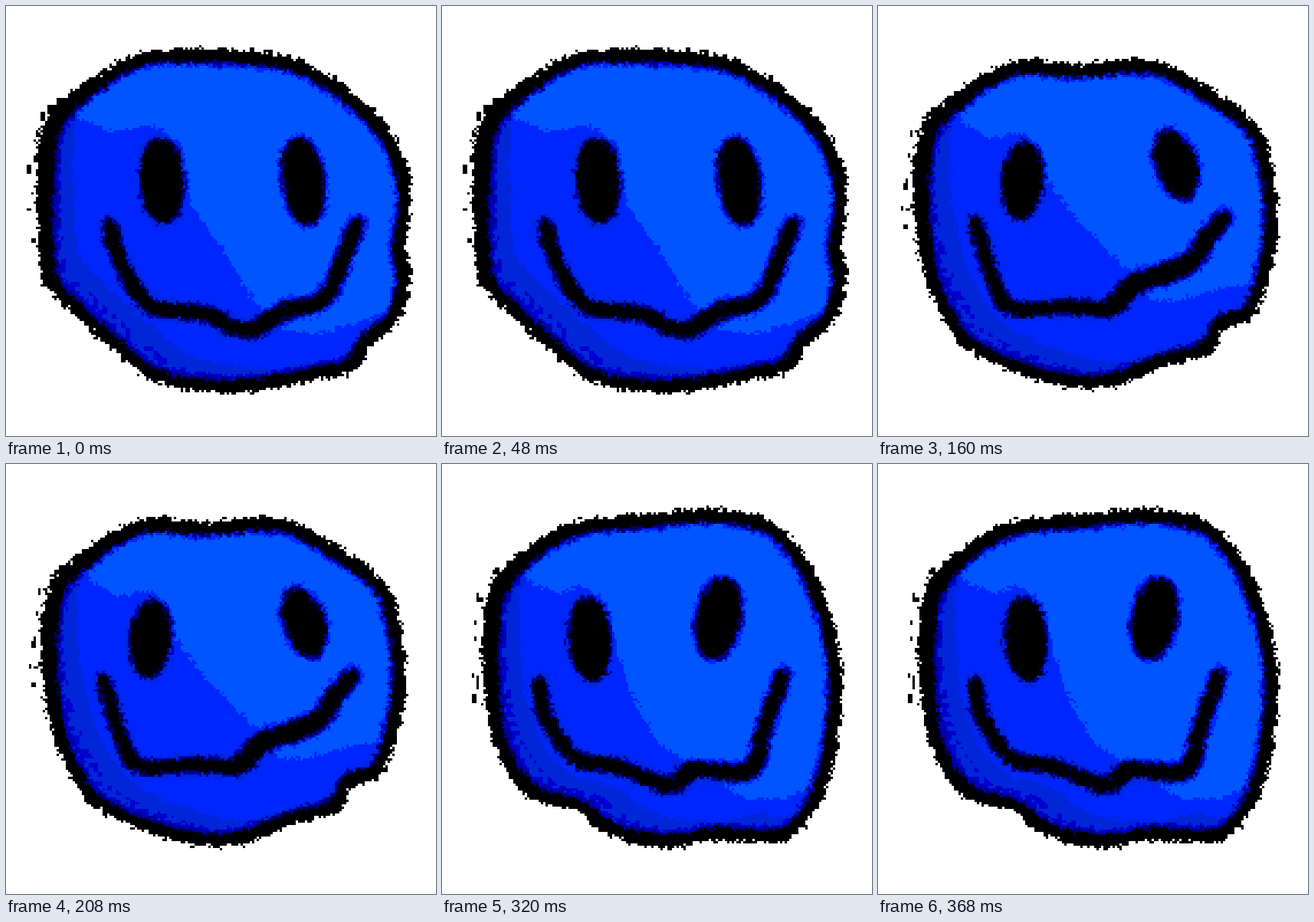
An HTML page with a canvas that plays this animation: 748 px wide and 748 px high, repeating every 400 ms.

```html
<!DOCTYPE html>
<html lang="en">
<head>
<meta charset="utf-8">
<title>Wobbly smiley</title>
<style>
  html, body { margin: 0; width: 100%; height: 100%; overflow: hidden; background: #fff; }
  body { position: relative; }
  canvas {
    position: absolute; left: 0; top: 0; width: 500vw; height: 100vh;
    image-rendering: pixelated; animation: flip 400ms steps(5) infinite;
  }
  @keyframes flip { to { transform: translateX(-100%); } }
</style>
</head>
<body>
<canvas id="sheet"></canvas>
<script>
const CELL = 4, SIZE = 748, N = SIZE / CELL;

// Key points of each pose. Eyes are cx, cy, rx, ry, tilt in degrees.
const crown = '350,87 480,78 575,100 640,172 680,270 694,345 ';
const poses = [
  {
    head: '240,80 370,76 490,87 580,132 660,205 697,275 706,345 695,420 704,465 686,545 635,590 605,634 500,658 390,674 265,656 190,602 110,530 65,480 55,400 54,290 70,195 140,130',
    lit: '110,185 185,217 255,208 308,250 318,335 385,435 445,525 530,570 690,520',
    mouth: '180,380 197,440 225,490 258,525 345,535 418,565 485,530 552,510 592,425 611,380',
    eyes: [[271, 304, 36, 73, -3], [517, 305, 34, 75, -8]],
    swell: 3
  },
  {
    head: '215,76 330,80 480,104 590,160 655,212 692,285 700,365 692,480 665,555 605,600 575,626 490,644 400,662 300,650 190,594 130,535 75,470 72,400 84,300 90,200 125,120',
    lit: '110,170 180,213 245,212 274,280 300,360 385,445 430,500 500,550 660,525',
    mouth: '176,378 188,430 235,500 275,518 375,523 420,544 535,503 575,455 607,400',
    eyes: [[246, 295, 24, 75, -6], [508, 319, 39, 72, -16]],
    swell: 3
  },
  {
    head: '245,94 340,100 470,93 545,122 655,200 682,260 696,350 688,440 655,540 605,560 575,604 490,630 395,664 290,655 160,602 108,535 75,450 60,340 65,240 90,190 165,130',
    lit: '120,180 190,228 255,222 288,290 345,370 440,465 480,514 610,490 690,490',
    mouth: '169,375 200,475 232,525 330,523 405,525 445,485 540,447 575,400 603,368',
    eyes: [[251, 304, 34, 66, 5], [519, 276, 33, 61, -17]],
    swell: 9
  },
  {
    head: crown + '686,440 662,570 605,645 520,645 400,667 250,650 150,595 95,505 75,400 70,300 100,205 175,155 245,105',
    lit: '150,200 215,245 270,237 280,335 320,435 380,517 450,547 545,565 680,545',
    mouth: '171,382 190,475 218,537 290,560 390,568 430,503 485,468 525,400 572,362',
    eyes: [[248, 311, 22, 68, 16], [481, 267, 37, 69, 14]],
    swell: 18
  },
  {
    head: crown + '692,460 662,580 595,656 480,654 400,667 300,650 230,604 150,578 95,500 75,400 70,300 85,210 155,140 235,100',
    lit: '120,180 190,222 255,217 298,300 330,400 385,490 460,535 545,585 680,555',
    mouth: '170,380 180,440 235,512 310,528 400,560 435,532 535,533 560,460 592,368',
    eyes: [[257, 305, 35, 72, -5], [481, 269, 37, 70, 10]],
    swell: 3
  }
];

// Each row steps one shade darker
const shades = [[0, 85, 255], [0, 38, 255], [0, 38, 216], [0, 0, 208], [0, 0, 164], [0, 0, 96], [0, 0, 0]];
const BLACK = 6;

// Catmull-Rom spline through the key points
function curve(text, closed) {
  const p = text.split(' ').map(s => s.split(',').map(Number)), n = p.length, out = [];
  const at = i => p[closed ? (i + n) % n : Math.max(0, Math.min(n - 1, i))];
  for (let i = 0; i < (closed ? n : n - 1); i++) {
    for (let t = 0; t < 1; t += 1 / 16) {
      out.push([0, 1].map(d => {
        const a = at(i - 1)[d], b = at(i)[d], c = at(i + 1)[d], e = at(i + 2)[d];
        return b + t * (c - a + t * (2 * a - 5 * b + 4 * c - e + t * (3 * (b - c) + e - a))) / 2;
      }));
    }
  }
  if (!closed) out.push(p[n - 1]);
  return out;
}

function hash(a, b, seed) {
  let h = Math.imul(a + 101, 374761393) ^ Math.imul(b + 57, 668265263) ^ Math.imul(seed + 1, 1274126177);
  h = Math.imul(h ^ h >>> 13, 1274126177);
  return ((h ^ h >>> 16) >>> 0) / 4294967296;
}

function mask(draw) {
  const c = document.createElement('canvas');
  c.width = c.height = N;
  const g = c.getContext('2d');
  g.scale(1 / CELL, 1 / CELL);
  draw(g);
  const px = g.getImageData(0, 0, N, N).data;
  return Float32Array.from({ length: N * N }, (_, i) => px[i * 4 + 3] / 255);
}

const clamp = v => Math.max(0, Math.min(N - 1, v));

function soften(m) {
  return m.map((_, i) => {
    const x = i % N, y = (i - x) / N;
    let sum = 0;
    for (let dy = -1; dy <= 1; dy++)
      for (let dx = -1; dx <= 1; dx++) sum += m[clamp(y + dy) * N + clamp(x + dx)];
    return sum / 9;
  });
}

function fill(g, pts, dx = 0, dy = 0) {
  g.beginPath();
  pts.forEach(([x, y]) => g.lineTo(x + dx, y + dy));
  g.fill();
}

// A brush line whose radius depends on the place along it
function brush(g, pts, radius) {
  pts.forEach(([x, y], i) => {
    g.beginPath();
    g.arc(x, y, radius(x, y, i / (pts.length - 1)), 0, Math.PI * 2);
    g.fill();
  });
}

function drawInk(g, pose, head) {
  brush(g, head, (x, y) => 21 + Math.max(0, 220 - x - y / 4) / 12);
  brush(g, curve(pose.mouth), (x, y, t) => (20 + pose.swell * Math.exp(-(((t - 0.66) / 0.16) ** 2))) / 2);
  for (const [x, y, rx, ry, tilt] of pose.eyes) {
    g.beginPath();
    g.ellipse(x, y, rx, ry, tilt * Math.PI / 180, 0, Math.PI * 2);
    g.fill();
  }
}

// Loose crumbs of ink off the upper left edge
function drawCrumbs(g, head, seed) {
  const edge = head.filter(([x, y]) => x < 110 && y > 150 && y < 420);
  for (let i = 0; i < 10; i++) {
    const r = k => hash(i, k, seed + 31);
    const [x, y] = edge[Math.floor(r(0) * edge.length)];
    const snap = v => Math.round(v / CELL) * CELL;
    g.fillRect(snap(x - 8 - 14 * r(1)), snap(y), 4 + snap(6 * r(2)), 4 + snap(14 * r(3)));
  }
}

// Reads a mask at a slightly scattered place to fray its edges
function frayed(m, x, y, amp, seed) {
  const slip = s => Math.round(amp * (hash(x >> 1, y >> 1, s) + hash(x, y, s + 1) - 1));
  return m[clamp(y + slip(seed)) * N + clamp(x + slip(seed + 2))];
}

function render(pose, seed) {
  const head = curve(pose.head, true), edge = curve(pose.lit);
  const body = mask(g => fill(g, head));
  const crumbs = mask(g => drawCrumbs(g, head, seed));
  const ink = soften(soften(soften(mask(g => drawInk(g, pose, head)))));
  const shadow = mask(g => fill(g, [...edge, [SIZE, edge.at(-1)[1]], [SIZE, SIZE], [0, SIZE], [0, edge[0][1]]]));
  // The rim shade lies outside a copy of the head moved to the upper right
  const core = mask(g => fill(g, head, 65, -45));
  const rim = mask(g => fill(g, head, 42, -28));

  const img = new ImageData(N, N);
  for (let y = 0; y < N; y++) {
    for (let x = 0; x < N; x++) {
      const i = y * N + x;
      let shade = BLACK;
      if (frayed(body, x, y, 1.7, seed) > 0.5) {
        const a = frayed(ink, x, y, 1.2, seed + 7);
        shade = 0;
        if (frayed(shadow, x, y, 1.4, seed + 13) > 0.5) shade = frayed(core, x, y, 1.2, seed + 19) > 0.5 ? 1 : 2;
        if (shade === 2 && rim[i] < 0.5 && hash(x >> 1, y >> 1, seed) > 0.6) shade = 3;
        if (a > 0.5) shade = BLACK;
        else if (a > 0.33) shade = 5;
        else if (a > 0.17) shade = 4;
        else if (a > 0.04) shade++;
      } else if (crumbs[i] < 0.5) continue;
      img.data.set([...shades[shade], 255], i * 4);
    }
  }
  return img;
}

const sheet = document.getElementById('sheet');
sheet.width = N * poses.length;
sheet.height = N;
const out = sheet.getContext('2d');
// The last two poses share their frayed edge
poses.forEach((pose, k) => out.putImageData(render(pose, Math.min(k, 3) * 100), k * N, 0));
</script>
</body>
</html>
```
